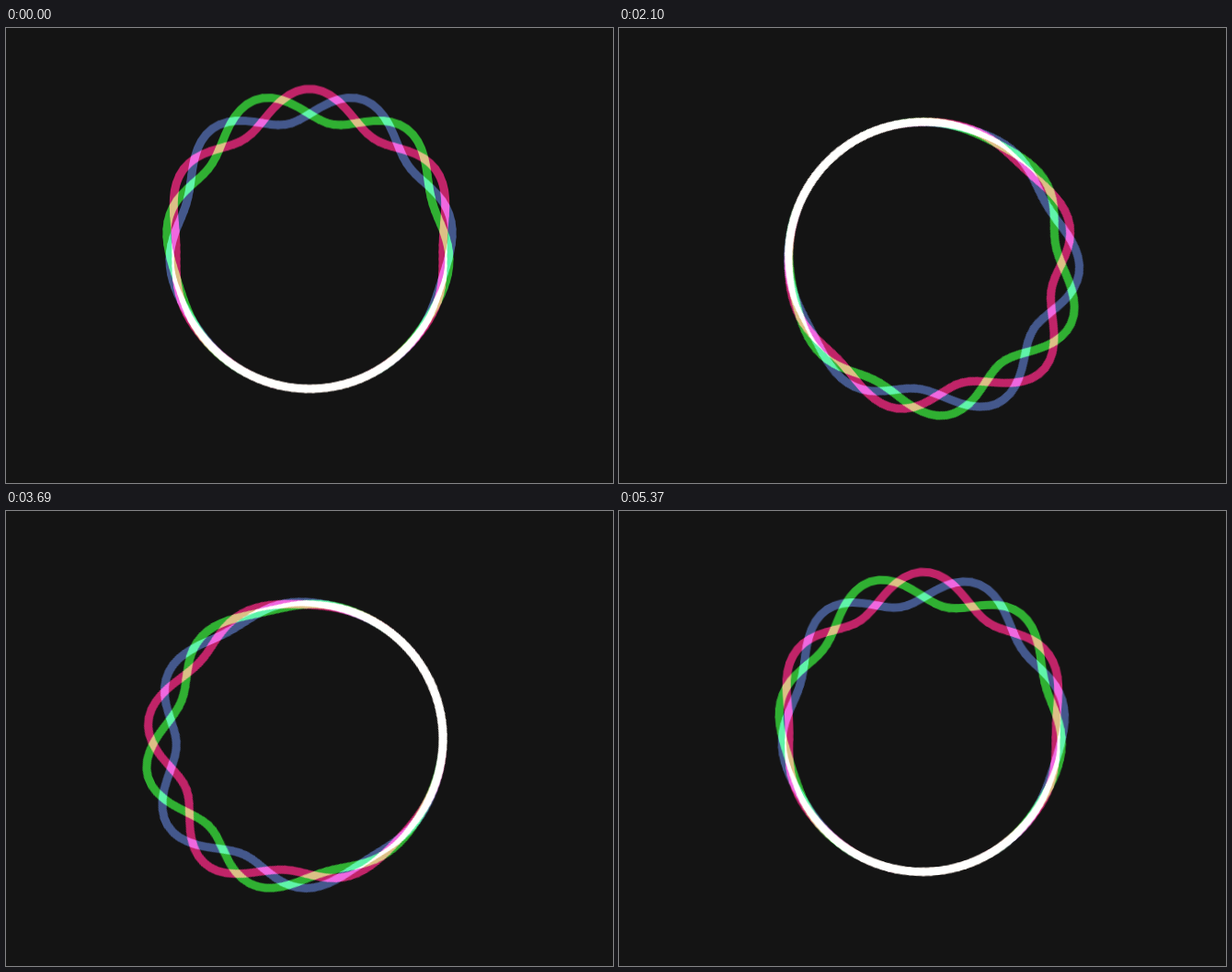
These frames come from a looping animation (660x495 px, 5400 ms). An HTML page without scripts:

```html
<!DOCTYPE html>
<html lang="en">
<head>
<meta charset="utf-8">
<title>Braided ring</title>
<style>
@property --phase {
  syntax: "<angle>";
  inherits: true;
  initial-value: 0deg;
}
html, body {
  margin: 0;
  width: 100%;
  height: 100%;
  overflow: hidden;
  background: #141414;
}
svg { display: block; }

/* the swell turns once per loop while eight waves run through it */
@keyframes turn {
  from { --phase: 0deg; transform: rotate(0deg); }
  to { --phase: 2880deg; transform: rotate(360deg); }
}
.braid {
  animation: turn 5.4s steps(180) infinite;
  fill: none;
  stroke-width: 9px;
  stroke-linecap: round;
}
.braid, .strand { mix-blend-mode: plus-lighter; }

/* r = 145 + 4.5 (1 + cos a)^2 (1 + cos w), each dash laid along the tangent */
.dash {
  --a: calc(var(--base) + var(--i) * 3deg);
  --w: calc(6 * var(--a) + var(--phase) + var(--shift));
  --swell: (1 + cos(var(--a)));
  --crest: (1 + cos(var(--w)));
  --r: (145 + 4.5 * var(--swell) * var(--swell) * var(--crest));
  --slope: (9 * var(--swell) * (sin(var(--a)) * var(--crest) + 3 * var(--swell) * sin(var(--w))));
  transform:
    rotate(var(--a))
    translateY(calc(-1px * var(--r)))
    rotate(atan(var(--slope) / var(--r)));
}
</style>
</head>
<body>
<svg width="660" height="495">
  <defs>
    <g id="arc">
      <path class="dash" d="M-4 0h8" style="--i:0"/>
      <path class="dash" d="M-4 0h8" style="--i:1"/>
      <path class="dash" d="M-4 0h8" style="--i:2"/>
      <path class="dash" d="M-4 0h8" style="--i:3"/>
      <path class="dash" d="M-4 0h8" style="--i:4"/>
      <path class="dash" d="M-4 0h8" style="--i:5"/>
      <path class="dash" d="M-4 0h8" style="--i:6"/>
      <path class="dash" d="M-4 0h8" style="--i:7"/>
      <path class="dash" d="M-4 0h8" style="--i:8"/>
      <path class="dash" d="M-4 0h8" style="--i:9"/>
    </g>
    <g id="ring">
      <use href="#arc" style="--base:0deg"/>
      <use href="#arc" style="--base:30deg"/>
      <use href="#arc" style="--base:60deg"/>
      <use href="#arc" style="--base:90deg"/>
      <use href="#arc" style="--base:120deg"/>
      <use href="#arc" style="--base:150deg"/>
      <use href="#arc" style="--base:180deg"/>
      <use href="#arc" style="--base:210deg"/>
      <use href="#arc" style="--base:240deg"/>
      <use href="#arc" style="--base:270deg"/>
      <use href="#arc" style="--base:300deg"/>
      <use href="#arc" style="--base:330deg"/>
    </g>
  </defs>
  <rect width="660" height="495" fill="#141414"/>
  <g transform="translate(330 247.5)" >
    <g class="braid">
      <use class="strand" href="#ring" stroke="rgb(172 16 84)" style="--shift:0deg"/>
      <use class="strand" href="#ring" stroke="rgb(28 156 30)" style="--shift:120deg"/>
      <use class="strand" href="#ring" stroke="rgb(48 68 120)" style="--shift:-120deg"/>
    </g>
  </g>
</svg>
</body>
</html>
```
